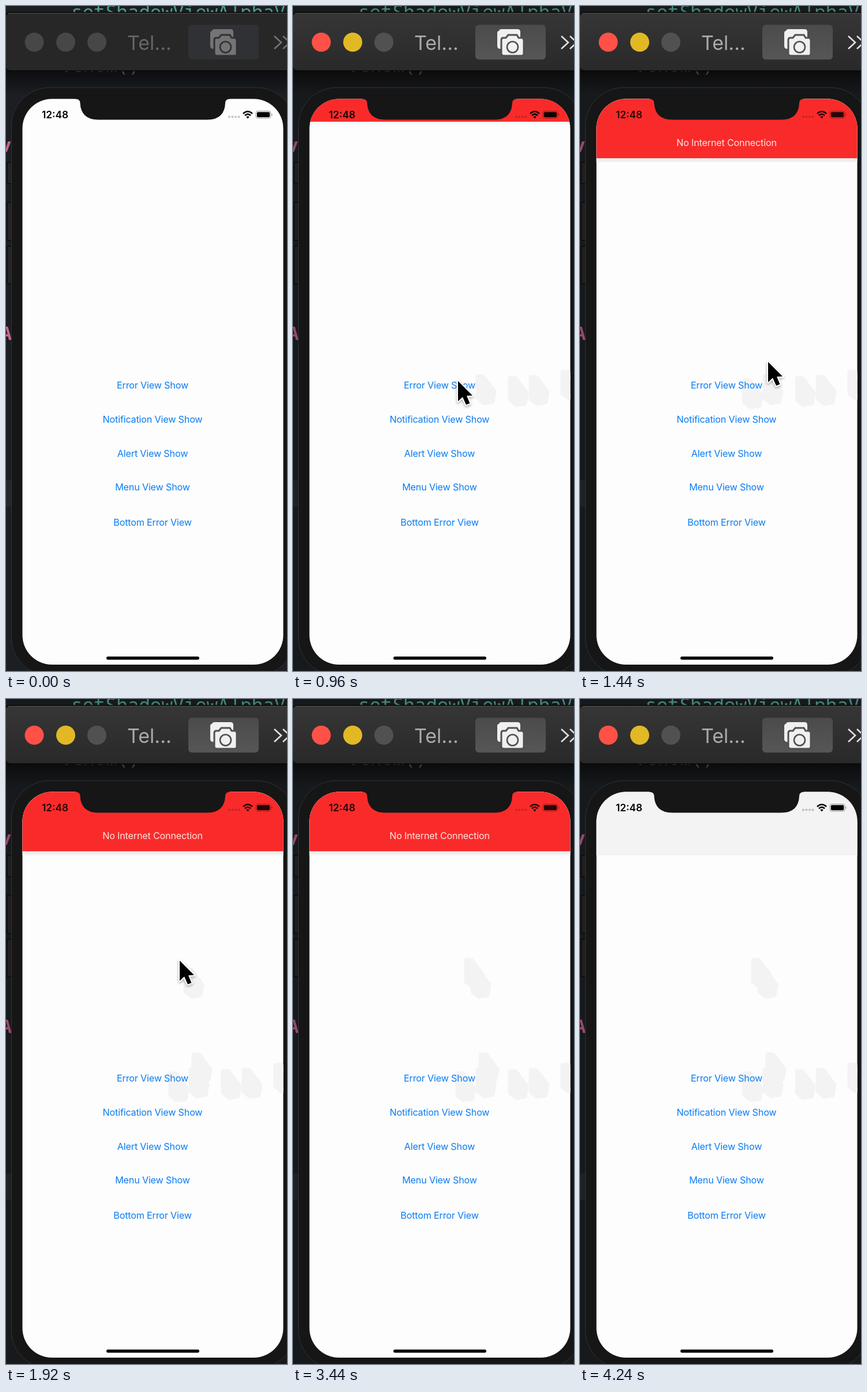
Write an HTML page that moves like this. It is 487 px wide and 1149 px high and loops after 4.32 s.

```html
<!DOCTYPE html>
<html lang="en">
<head>
<meta charset="utf-8">
<title>Error banner demo</title>
<style>
  html, body { margin: 0; width: 100%; height: 100%; overflow: hidden; background: #1b1e22; }
  svg { display: block; width: 487px; height: 1149px; }
  text { font-family: Inter, Roboto, sans-serif; }
  .code text { font: 500 32.6px "Noto Sans Mono", "DejaVu Sans Mono", monospace; }
  .code #keywords text { font-weight: 700; }
  .label { font-size: 16.2px; letter-spacing: -.2px; text-anchor: middle; }
</style>
</head>
<body>
<svg viewBox="0 0 487 1149">
  <defs>
    <linearGradient id="shade" x2="0" y2="1">
      <stop offset="0" stop-color="#000" stop-opacity=".55"/>
      <stop offset="1" stop-color="#000" stop-opacity="0"/>
    </linearGradient>
    <linearGradient id="barFill" x2="0" y2="1">
      <stop offset="0" stop-color="#363636"/>
      <stop offset="1" stop-color="#292929"/>
    </linearGradient>
    <linearGradient id="buttonFill" x2="0" y2="1">
      <stop offset="0" stop-color="#4b4b4b"/>
      <stop offset="1" stop-color="#565656"/>
    </linearGradient>
    <clipPath id="screen"><rect x="28.5" y="160.500" width="452" height="977.500" rx="51"/></clipPath>
    <path id="arrow" d="M0 0V35L8 27.5L14 41L20.5 38.5L15 25.5L25 25Z" stroke-linejoin="round"/>
    <path id="smudge" d="M0 0H8L27 25L24 42L10 44L0 36Z" stroke-linejoin="round"/>
    <filter id="soft" x="-50%" y="-50%" width="200%" height="200%">
      <feDropShadow dx="0" dy="2" stdDeviation="2" flood-opacity=".35"/>
    </filter>
  </defs>

  <rect width="487" height="1149" fill="#1b1e22"/>
  <g class="code">
    <text x="113" y="22" fill="#4f9d8a">setShadowViewAlphaV</text>
    <text x="95" y="114" fill="#8b8d90">venom()</text>
    <g id="keywords" text-anchor="end">
      <text x="9" y="252">v</text>
      <text x="10" y="577">A</text>
    </g>
  </g>
  <g fill="#242424" stroke="#0b0b0b" stroke-width="1.5">
    <rect x="2" y="270" width="12" height="37"/>
    <rect x="2" y="339" width="12" height="66"/>
    <rect x="2" y="415" width="12" height="65"/>
  </g>
  <rect y="820" width="9" height="45" fill="#24272b"/>
  <rect id="backShade" width="487" height="1149" fill="#000"/>

  <rect y="112" width="487" height="42" fill="url(#shade)"/>
  <path d="M500 11H8Q-1 11 -1 20V103Q-1 112 8 112H500Z" id="bar" stroke="#060606" stroke-width="1.5"/>
  <path d="M4 12.500H487" stroke="#505050" stroke-width="1"/>
  <g id="lights">
    <circle cx="49" cy="62.500" r="16.5"/>
    <circle cx="103.5" cy="62.500" r="16.5"/>
    <circle cx="157.5" cy="62.500" r="16.5"/>
  </g>
  <text id="title" x="210" y="76" font-size="34">Tel...</text>
  <rect id="button" x="316" y="32.500" width="122" height="60" rx="6"/>
  <g id="cameras">
    <path d="M357 43Q358 40 361 40H389Q394 40 394 45V70Q394 74 389 74H359Q354 74 354 69V47Q354 43 357 43Z"/>
    <path class="cut" d="M364 55H369L373 50H388L391 55H396Q400 55 400 60V82Q400 86 396 86H366Q361 86 361 82V59Q361 55 364 55Z" stroke-width="3"/>
    <circle class="cut" cx="380.5" cy="71" r="9.5" stroke-width="2.6"/>
  </g>
  <path id="more" d="M465 52L477 63L465 74M480 52L492 63L480 74" fill="none" stroke-width="2.6"/>

  <rect x="9.5" y="141" width="491" height="1016" rx="66" fill="#161616" stroke="#303235"/>
  <g clip-path="url(#screen)">
    <rect x="28" y="160" width="453" height="978" fill="#fdfdfd"/>
    <rect id="band" x="28" y="160" width="453" height="110" fill="#f3f3f3"/>
    <g id="trail" fill="#f3f3f3" stroke="#f3f3f3" stroke-width="9"></g>
    <g id="labels" fill="#0a7cf3"></g>
    <g id="banner">
      <rect x="28" y="263" width="453" height="6" fill="url(#shade)" opacity=".08"/>
      <rect x="28" y="150" width="453" height="113" fill="#f92b2a"/>
      <text class="label" x="254" y="242" fill="#fde3e1">No Internet Connection</text>
    </g>
    <g id="status">
      <text x="62" y="194" font-size="17.3" font-weight="600">12:48</text>
      <g opacity=".22">
        <circle cx="387" cy="191.5" r="2"/><circle cx="392.5" cy="191.5" r="2"/>
        <circle cx="398" cy="191.5" r="2"/><circle cx="403.5" cy="191.5" r="2"/>
      </g>
      <g fill="none" stroke="#000" stroke-width="2.6">
        <path d="M411 186Q419 178.500 427 186M414 189.300Q419 184.500 424 189.300"/>
        <path d="M419 194.500L416.300 191.500Q419 189.300 421.700 191.500Z" fill="#000" stroke="none"/>
      </g>
      <rect x="433" y="181.500" width="26" height="12.500" rx="3.500" fill="none" stroke="#000" opacity=".4"/>
      <rect x="434.800" y="183.300" width="22.400" height="9" rx="2"/>
      <path d="M460.500 185.500Q463 187.800 460.500 190Z" opacity=".45"/>
    </g>
    <rect x="174" y="1124" width="161" height="5.500" rx="2.750" fill="#050505"/>
  </g>
  <path d="M120 159V160.500Q128.500 160.500 128.500 168Q130 196.500 160 196.500H349Q378.500 196.500 380 168Q380 160.500 388 160.500V159Z" fill="#161616"/>
  <g id="cursor" filter="url(#soft)">
    <use href="#arrow" fill="#000" stroke="#fff" stroke-width="4"/>
    <use href="#arrow" fill="#000"/>
  </g>
</svg>
<script>
const LOOP = 4320, STEP = 80, BANNER_TRAVEL = 104;
const $ = id => document.getElementById(id);

const labels = [
  ["Error View Show", 661], ["Notification View Show", 720], ["Alert View Show", 779],
  ["Menu View Show", 837], ["Bottom Error View", 898]
];
$("labels").innerHTML = labels
  .map(([text, y]) => `<text class="label" x="254" y="${y}">${text}</text>`).join("");

// Pointer stops: time, x, y
const stops = [
  [320, 468, 633], [400, 413, 642], [480, 377, 644], [560, 321, 641],
  [640, 286, 648], [1440, 326, 615], [1520, 312, 469], [1600, 301, 452]
];
const POINTER_END = 2000;
$("trail").innerHTML = stops
  .map(([, x, y]) => `<use href="#smudge" x="${x}" y="${y}"/>`).join("");
const marks = [...$("trail").children];

const ease = (t, start, length) => {
  const u = Math.min(1, Math.max(0, (t - start) / length));
  return u * u * (3 - 2 * u);
};
const show = (node, visible) => node.setAttribute("visibility", visible ? "visible" : "hidden");

function paintWindow(active) {
  const pick = (on, off) => active ? on : off;
  const fills = pick(["#ff5147", "#e2b925", "#515151"], ["#474747", "#474747", "#474747"]);
  [...$("lights").children].forEach((light, i) => light.setAttribute("fill", fills[i]));
  $("bar").setAttribute("fill", pick("url(#barFill)", "#272728"));
  $("title").setAttribute("fill", pick("#ababab", "#666"));
  $("button").setAttribute("fill", pick("url(#buttonFill)", "#303135"));
  $("cameras").setAttribute("fill", pick("#f0f0f0", "#747474"));
  $("cameras").querySelectorAll(".cut")
    .forEach(part => part.setAttribute("stroke", pick("#505050", "#303135")));
  $("more").setAttribute("stroke", pick("#e2e2e2", "#747474"));
  $("keywords").setAttribute("fill", pick("#ad5580", "#c9648e"));
  $("backShade").setAttribute("opacity", pick(.14, 0));
}

function draw(t) {
  paintWindow(t >= 800);

  const shown = ease(t, 840, 280) - ease(t, 4000, 240);
  $("banner").setAttribute("transform", `translate(0 ${(shown - 1) * BANNER_TRAVEL})`);
  show($("banner"), shown > 0);
  show($("band"), t >= 1120);
  $("status").setAttribute("opacity", 1 - .15 * shown);

  const at = stops.filter(([time]) => time <= t).length - 1;
  const pointing = at >= 0 && t < POINTER_END;
  show($("cursor"), pointing);
  if (pointing) $("cursor").setAttribute("transform", `translate(${stops[at][1]} ${stops[at][2]})`);
  marks.forEach((mark, i) => show(mark, i < at || (i === at && !pointing)));
}

function tick() {
  const t = performance.now() % LOOP;
  draw(Math.floor(t / STEP) * STEP);
  requestAnimationFrame(tick);
}
tick();
</script>
</body>
</html>
```
